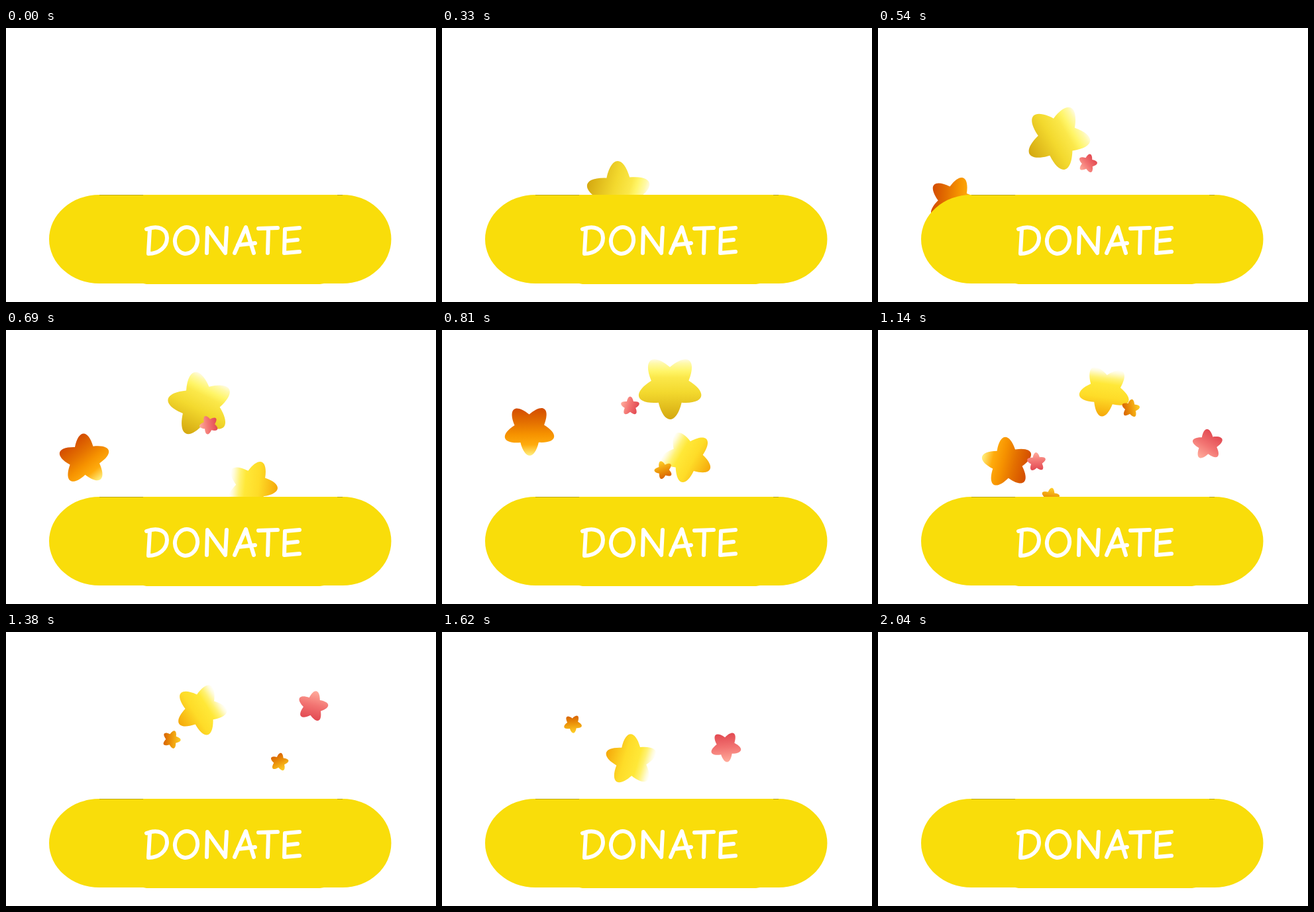
Write an HTML page that moves like this. It is 649 px wide and 414 px high and loops after 2.85 s.

```html
<!DOCTYPE html>
<html lang="en">
<head>
<meta charset="utf-8">
<title>Donate button</title>
<style>
  html, body { margin: 0; width: 100%; height: 100%; overflow: hidden; background: #fff; }
  svg { display: block; width: 649px; height: 414px; }
  .lettering { fill: none; stroke: #fff; stroke-width: 6; stroke-linecap: round; stroke-linejoin: round; }
</style>
</head>
<body>
<svg viewBox="0 0 649 414">
  <defs>
    <linearGradient id="gold" x2="0" y2="1">
      <stop offset="0" stop-color="#fffbe0"/>
      <stop offset=".07" stop-color="#fff9a8"/>
      <stop offset=".2" stop-color="#fff568"/>
      <stop offset=".3" stop-color="#fbe84a"/>
      <stop offset=".55" stop-color="#f3d92e"/>
      <stop offset="1" stop-color="#d4a810"/>
    </linearGradient>
    <linearGradient id="lemon" x2="0" y2="1">
      <stop offset="0" stop-color="#fff"/>
      <stop offset=".07" stop-color="#fffbd8"/>
      <stop offset=".2" stop-color="#fff170"/>
      <stop offset=".32" stop-color="#ffe838"/>
      <stop offset=".6" stop-color="#fedc28"/>
      <stop offset="1" stop-color="#f5a80a"/>
    </linearGradient>
    <linearGradient id="orange" x2="0" y2="1">
      <stop offset="0" stop-color="#d34c00"/>
      <stop offset=".3" stop-color="#e47000"/>
      <stop offset=".55" stop-color="#f69200"/>
      <stop offset=".77" stop-color="#ffab0c"/>
      <stop offset="1" stop-color="#fff080"/>
    </linearGradient>
    <linearGradient id="amber" x2="0" y2="1">
      <stop offset="0" stop-color="#d96400"/>
      <stop offset=".5" stop-color="#ee9a0c"/>
      <stop offset="1" stop-color="#ffd028"/>
    </linearGradient>
    <linearGradient id="pink" x2="0" y2="1">
      <stop offset="0" stop-color="#e24a52"/>
      <stop offset=".5" stop-color="#f27472"/>
      <stop offset="1" stop-color="#ffac9c"/>
    </linearGradient>
  </defs>
  <g id="stars"></g>
  <path fill="#f9dd0a" d="M141 252H508A73.5 67 0 0 1 508 386H480L474 387H212L207 386H141A76 67 0 0 1 141 252Z"/>
  <path fill="none" stroke="#bfa80a" d="M141 252.5H207M500 252.5H508"/>
  <g class="lettering" role="img" aria-label="DONATE">
    <path d="M212 304C230 297 243 304 243 317C243 331 231 341 215 341M217 304L215 340"/>
    <ellipse cx="272" cy="321" rx="17" ry="20" transform="rotate(10 272 321)"/>
    <path d="M303 340L304 302L331 340L333 302"/>
    <path d="M345 340L362 301L374 340M350 328L376 325"/>
    <path d="M381 303L410 302M396 303L395 340"/>
    <path d="M443 302L421 304L420 340L443 338M421 322L440 320"/>
  </g>
</svg>
<script>
const LOOP = 2850, STEP = 30;
const ROUND = 150;   // ms over which an arch turns at its top
const SWEEP = 170;   // ms scale of the sideways swing
const FLOOR = 310;   // stars below this line are behind the button

// Each star is known by its highest point (at, x, y), its sideways reach,
// its climbing and falling speed, and its angle and spin there.
const stars = [
  { fill: 'gold', size: 49.5, at: 845, x: 364, y: 84, reach: 98, rise: .43, fall: 1.2, angle: -8, spin: -.222 },
  { fill: 'orange', size: 39, at: 920, x: 157, y: 133, reach: 44, rise: .5, fall: .58, angle: 34, spin: .315 },
  { fill: 'lemon', size: 39.5, at: 1200, x: 328, y: 87, reach: -43, rise: .39, fall: .36, angle: 20, spin: .206 },
  { fill: 'pink', size: 23.5, at: 1380, x: 463, y: 112, reach: -39, rise: .46, fall: .46, angle: 194, spin: .67 },
  { fill: 'pink', size: 14.5, at: 835, x: 278, y: 114, reach: -41, rise: .5, fall: .45, angle: 113, spin: .21 },
  { fill: 'amber', size: 14, at: 1110, x: 374, y: 117, reach: 42, rise: .51, fall: .5, angle: -109, spin: .305 },
  { fill: 'amber', size: 14, at: 1545, x: 216, y: 131, reach: -45, rise: .43, fall: .44, angle: -30, spin: .345 }
];

const polar = (radius, deg) => {
  const a = deg * Math.PI / 180;
  return [radius * Math.cos(a), radius * Math.sin(a)].map(v => v.toFixed(3)).join(' ');
};

// Unit star with rounded tips, one of them pointing down.
function starPath() {
  let d = 'M' + polar(.6, 54);
  for (let tip = 90; tip < 450; tip += 72) {
    d += `C${polar(1.18, tip - 9)} ${polar(1.18, tip + 9)} ${polar(.6, tip + 36)}`;
  }
  return d + 'Z';
}

function pose(star, t) {
  const d = t - star.at;
  const speed = d < 0 ? star.rise : star.fall;
  return {
    x: star.x + star.reach * Math.tanh(d / SWEEP),
    y: star.y + speed * (Math.hypot(d, ROUND) - ROUND),
    angle: star.angle + star.spin * d
  };
}

const layer = document.getElementById('stars');
const outline = starPath();
for (const star of stars) {
  star.node = document.createElementNS(layer.namespaceURI, 'path');
  star.node.setAttribute('d', outline);
  star.node.setAttribute('fill', `url(#${star.fill})`);
  layer.append(star.node);
}

function draw(time) {
  const t = Math.floor(time / STEP) * STEP;
  for (const star of stars) {
    const { x, y, angle } = pose(star, t);
    star.node.style.display = y < FLOOR ? '' : 'none';
    star.node.setAttribute('transform', `translate(${x} ${y}) rotate(${angle}) scale(${star.size})`);
  }
}

const start = performance.now();
function tick() {
  draw((performance.now() - start) % LOOP);
  requestAnimationFrame(tick);
}
tick();
</script>
</body>
</html>
```
